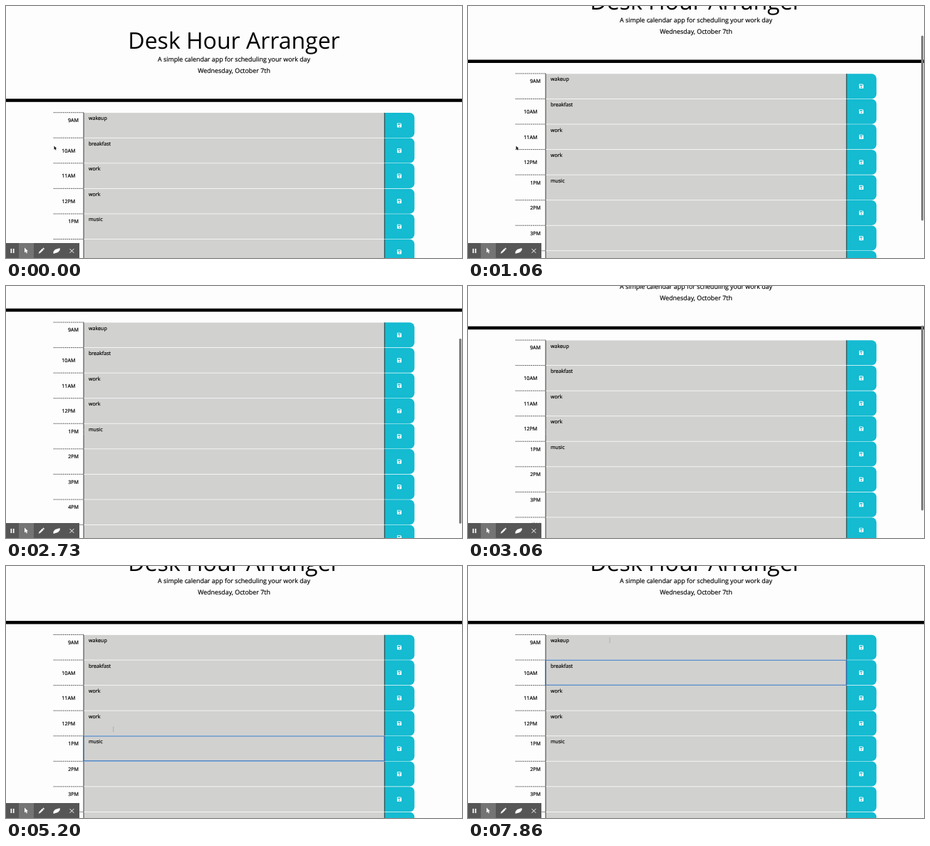
Animation, 640 px wide and 354 px high, one loop 8 s. Source, as an HTML page with a canvas:

```html
<!DOCTYPE html>
<html lang="en">
<head>
<meta charset="utf-8">
<title>Desk Hour Arranger</title>
<style>
  html, body { margin: 0; width: 100%; height: 100%; overflow: hidden; background: #fdfdfd; }
  canvas { display: block; width: 640px; height: 354px; }
</style>
</head>
<body>
<canvas id="stage" width="640" height="354"></canvas>
<script>
const ctx = document.getElementById('stage').getContext('2d');
const W = 640, H = 354, LOOP = 8000, STEP = 200 / 3;
const FONT = '"Open Sans", "Noto Sans", sans-serif';
const PAGE = '#fdfdfd', GREY = '#d1d1d0', TEAL = '#14bbd1';

// Table geometry in page coordinates
const LEFT = 66.7, TEXT_X = 108.9, BTN_X = 531.1, RIGHT = 573.3;
const TOP = 149.7, ROW = 35.56, ROWS = 9;
const tasks = ['wakeup', 'breakfast', 'work', 'work', 'music'];

// The page scrolls down to LOW and back up to REST
const LOW = 127.5, REST = 53.2;
// From FIRST_CLICK on, a row is clicked every CLICK_GAP, going upwards
const FIRST_CLICK = 4800, CLICK_GAP = 800, FIRST_ROW = 4;

ctx.textRendering = 'geometricPrecision';

const progress = (t, start, length) => Math.min(1, Math.max(0, (t - start) / length));
const easeOut = (p, power) => 1 - (1 - p) ** power;

function scrollAt(t) {
  const down = LOW * progress(t, 0, 2267) ** 1.12;
  return down - (LOW - REST) * easeOut(progress(t, 2400, 1060), 1.3);
}

function mouseAt(t) {
  let x = 68, y = 197;
  const move = (start, length, dx, dy) => {
    const p = easeOut(progress(t, start, length), 3);
    x += dx * p;
    y += dy * p;
  };
  move(2400, 300, 41, 8);
  move(3260, 470, 14, 6);
  move(4130, 570, 17, 46);
  for (let i = 0; i < FIRST_ROW; i++) {
    move(FIRST_CLICK + i * CLICK_GAP + 260, 400, 14.75, -38.2);
  }
  return [x, y];
}

function focusAt(t) {
  return t < FIRST_CLICK ? -1 : FIRST_ROW - Math.floor((t - FIRST_CLICK) / CLICK_GAP);
}

function text(str, x, y, size, align = 'left') {
  ctx.font = `${size}px ${FONT}`;
  ctx.textAlign = align;
  ctx.fillStyle = ctx.strokeStyle = '#000';
  ctx.fillText(str, x, y);
  if (size < 10) {
    // Slightly heavier small print
    ctx.lineWidth = 0.18;
    ctx.strokeText(str, x, y);
  }
}

function rect(x, y, w, h, color) {
  ctx.fillStyle = color;
  ctx.fillRect(x, y, w, h);
}

function roundRect(x, y, w, h, r, color) {
  ctx.beginPath();
  ctx.roundRect(x, y, w, h, r);
  ctx.fillStyle = color;
  ctx.fill();
}

function shape(points, color) {
  ctx.beginPath();
  points.forEach(([x, y]) => ctx.lineTo(x, y));
  ctx.closePath();
  ctx.fillStyle = color;
  ctx.fill();
}

function line(x1, y1, x2, y2, color, width) {
  ctx.beginPath();
  ctx.moveTo(x1, y1);
  ctx.lineTo(x2, y2);
  ctx.strokeStyle = color;
  ctx.lineWidth = width;
  ctx.stroke();
}

function dashes(y) {
  ctx.setLineDash([1.7, 1]);
  line(LEFT, y, TEXT_X, y, '#222', 0.8);
  ctx.setLineDash([]);
}

function saveIcon(x, y) {
  roundRect(x - 3.1, y - 3.1, 6.2, 6.2, [0.6, 1.8, 0.6, 0.6], '#fff');
  rect(x - 2.1, y - 2.2, 3.7, 1.7, TEAL);
  roundRect(x - 0.9, y + 0.4, 1.8, 1.8, 0.9, TEAL);
}

function header() {
  text('Desk Hour Arranger', W / 2, 60, 32, 'center');
  text('A simple calendar app for scheduling your work day', W / 2, 77.7, 8.89, 'center');
  text('Wednesday, October 7th', W / 2, 93.6, 8.89, 'center');
  rect(0, 130.3, W, 4.5, '#000');
}

function drawRow(i) {
  const y = TOP + i * ROW;
  const hour = (i + 8) % 12 + 1 + (i < 3 ? 'AM' : 'PM');
  rect(TEXT_X, y + 0.4, BTN_X - TEXT_X, ROW - 0.8, GREY);
  roundRect(BTN_X, y + 0.3, RIGHT - BTN_X, ROW - 0.6, [0, 6.7, 6.7, 0], TEAL);
  for (const x of [TEXT_X, BTN_X]) rect(x - 0.3, y + 0.3, 0.8, ROW - 0.6, '#111');
  dashes(y);
  if (hour.length > 3) text(hour, 87.8, y + 20.5, 7.11, 'center');
  else text(hour, 102, y + 13.4, 7.11, 'right');
  text(tasks[i] || '', 116, y + 10.5, 7.11);
  saveIcon(552, y + 17.8);
}

function focusRing(i) {
  ctx.strokeStyle = '#2a70be';
  ctx.lineWidth = 1.1;
  ctx.beginPath();
  ctx.roundRect(TEXT_X - 0.1, TOP + i * ROW + 0.2, BTN_X - TEXT_X + 0.2, ROW - 0.6, 1);
  ctx.stroke();
}

function scrollbar(t, scroll) {
  if (t < 60) return;
  ctx.globalAlpha = 1 - progress(t, 3860, 200);
  roundRect(636, 1.3 + 0.735 * scroll, 3.2, 260, 1.6, '#7d7d7d');
  ctx.globalAlpha = 1;
}

function arrow(x, y, scale, color) {
  ctx.save();
  ctx.translate(x, y);
  ctx.scale(scale, scale);
  shape([[0, 0], [0, 7], [1.7, 5.5], [2.8, 8], [4, 7.5], [2.9, 5], [5, 5]], color);
  ctx.restore();
}

function beam(x, y) {
  line(x, y - 3, x, y + 3, '#a0a0a0', 0.7);
  for (const end of [y - 3.3, y + 3.3]) line(x - 1, end, x + 1, end, '#b0b0b0', 0.6);
}

function toolbar() {
  const mid = 344;
  rect(0, 333, 103, 21, '#565656');
  rect(18, 333, 21, 21, '#747474');
  for (const x of [6.5, 9.8]) rect(x, mid - 3.1, 1.7, 6.2, '#fff');
  arrow(26, mid - 4.4, 1, '#fff');

  ctx.save();
  ctx.translate(49.5, mid);
  ctx.rotate(-Math.PI / 4);
  rect(-3.2, -1.2, 6.5, 2.4, '#fff');
  rect(3.9, -1.2, 1.4, 2.4, '#fff');
  shape([[-3.2, -1.2], [-3.2, 1.2], [-5.4, 0]], '#fff');
  ctx.restore();

  shape([[66.5, 348], [66.5, 345], [69, 342], [75.6, 340], [75.6, 343], [73, 346]], '#fff');
  for (const d of [-2.9, 2.9]) line(92.4 - d, mid - 2.9, 92.4 + d, mid + 2.9, '#fff', 1);
}

function draw(t) {
  const scroll = scrollAt(t), focus = focusAt(t);
  const [mx, my] = mouseAt(t);
  rect(0, 0, W, H, PAGE);
  ctx.save();
  ctx.translate(0, -scroll);
  header();
  for (let i = 0; i < ROWS; i++) drawRow(i);
  dashes(TOP + ROWS * ROW);
  if (focus >= 0) focusRing(focus);
  ctx.restore();
  scrollbar(t, scroll);
  if (mx < TEXT_X - 1) arrow(mx - 0.5, my - 0.5, 0.75, '#111');
  else beam(mx, my);
  toolbar();
}

// Motion advances 15 times a second
function tick() {
  const t = performance.now() % LOOP;
  draw(Math.floor((t + 7) / STEP) * STEP % LOOP);
  requestAnimationFrame(tick);
}
tick();
</script>
</body>
</html>
```
